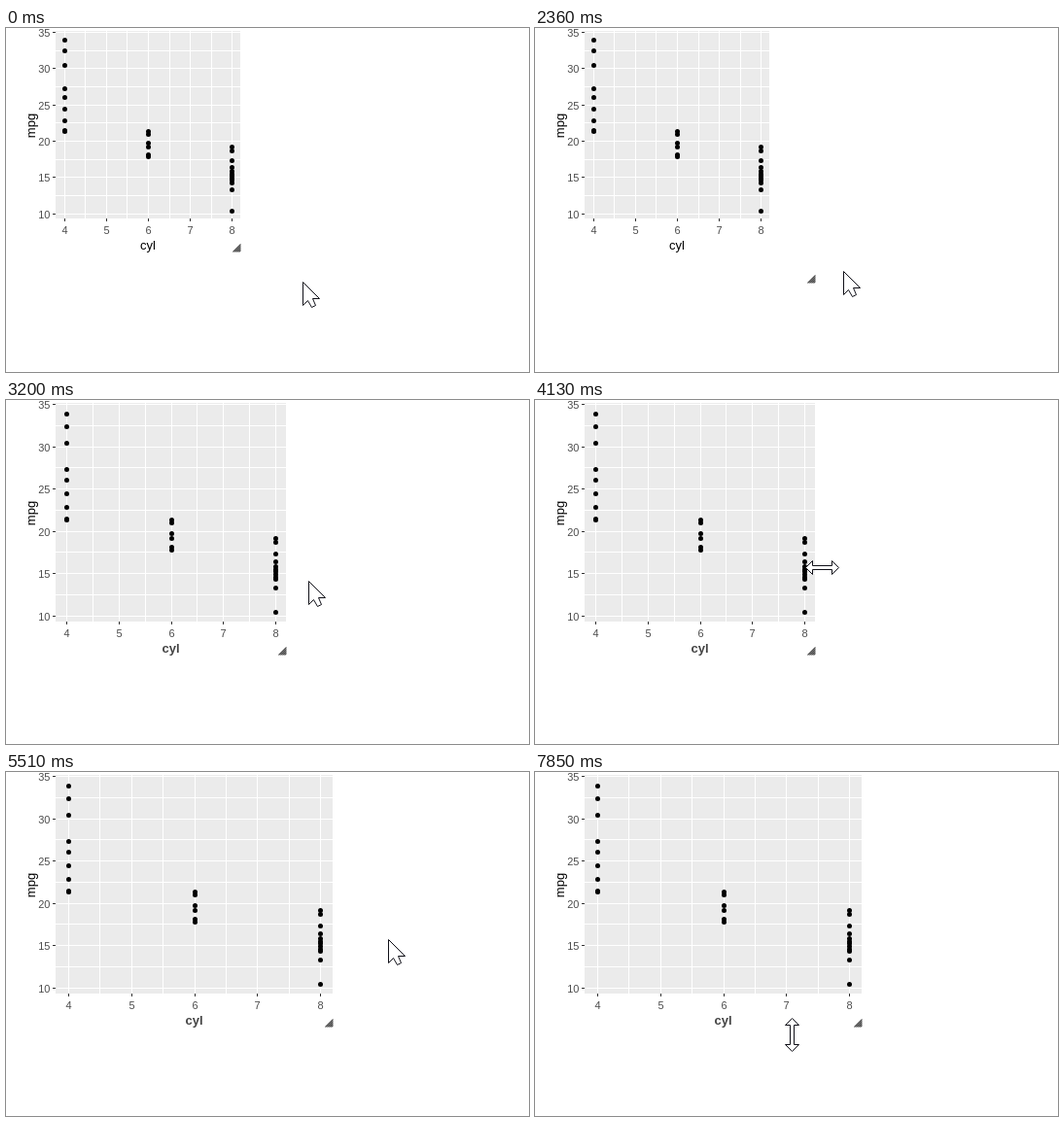
These frames come from a looping animation (538x354 px, 8 s). An HTML page:

```html
<!DOCTYPE html>
<html lang="en">
<head>
<meta charset="utf-8">
<title>Resizable scatter plot</title>
<style>
  html, body { margin: 0; width: 100%; height: 100%; overflow: hidden; background: #fff; }
  svg { display: block; width: 538px; height: 354px; }
  text { font-family: "Liberation Sans", Arial, sans-serif; font-size: 11px; fill: #4d4d4d; }
  .title { font-size: 13px; fill: #000; }
  .bold { font-weight: bold; fill: #444; }
  .line { shape-rendering: crispEdges; }
  .cursor path { fill: #fff; stroke: #101018; stroke-linejoin: round; }
</style>
</head>
<body>
<svg id="stage" viewBox="0 0 538 354"></svg>
<script>
const LOOP = 8000;
const STEP = 77;           // ms between visible cursor positions
const REDRAW_DELAY = 620;  // ms from the end of a drag to the new plot
const stage = document.getElementById('stage');

function add(parent, tag, attrs, text) {
  const el = document.createElementNS('http://www.w3.org/2000/svg', tag);
  for (const key in attrs) el.setAttribute(key, attrs[key]);
  if (text !== undefined) el.textContent = text;
  return parent.appendChild(el);
}

function range(from, to, step) {
  const count = Math.round((to - from) / step) + 1;
  return Array.from({ length: count }, (_, i) => from + i * step);
}

// Fuel economy by number of cylinders
const data = {
  4: [33.9, 32.4, 30.4, 27.3, 26, 24.4, 22.8, 21.5, 21.4],
  6: [21.4, 21, 19.7, 19.2, 18.1, 17.8],
  8: [19.2, 18.7, 17.3, 16.4, ...range(14.3, 15.8, 0.3), 13.3, 10.4]
};

const firstSize = { x: 241, y: 230 };
const plotLayer = add(stage, 'g', {});
let shownSize = '';

// The panel's right and bottom edges follow the size set with the grip
function drawPlot(size) {
  const key = size.x + ',' + size.y;
  if (key === shownSize) return;
  shownSize = key;
  plotLayer.replaceChildren();

  const left = 51, top = 3, right = size.x, bottom = size.y - 34;
  const w = right - left, h = bottom - top;
  const px = v => Math.round(left + w * (v - 3.8) / 4.4) + 0.5;
  const py = v => Math.floor(bottom - h * (v - 9.225) / 25.85 + 1) + 0.5;
  const line = (d, stroke) => add(plotLayer, 'path', { d, stroke, class: 'line' });
  const label = (text, attrs) => add(plotLayer, 'text', { 'text-anchor': 'middle', ...attrs }, text);

  add(plotLayer, 'rect', { x: left, y: top, width: w, height: h, fill: '#ebebeb', class: 'line' });
  for (const v of range(4, 8, 0.5)) line(`M${px(v)} ${top}V${bottom}`, '#fff');
  for (const v of range(10, 35, 2.5)) line(`M${left} ${py(v)}H${right}`, '#fff');

  for (const v of range(4, 8, 1)) {
    line(`M${px(v)} ${bottom}v3`, '#333');
    label(v, { x: px(v), y: bottom + 16 });
  }
  for (const v of range(10, 35, 5)) {
    line(`M${left - 3} ${py(v)}h3`, '#333');
    label(v, { x: left - 5.5, y: py(v) + 4.5, 'text-anchor': 'end' });
  }
  for (const cyl in data)
    for (const mpg of data[cyl])
      add(plotLayer, 'circle', { cx: px(+cyl), cy: py(mpg), r: 2.5 });

  const resized = size.x !== firstSize.x;
  label('cyl', { x: (left + right) / 2, y: bottom + 31.5, class: resized ? 'title bold' : 'title' });
  label('mpg', {
    transform: `translate(29.5 ${(top + bottom) / 2 + 1}) rotate(-90)`, class: 'title'
  });
}

const grip = add(stage, 'path', {
  d: range(2, 8, 2).map(n => `M${-n} 0L0 ${-n}`).join(''),
  stroke: '#4a4a4a', 'stroke-width': 1.1, fill: 'none'
});

const cursor = add(stage, 'g', { class: 'cursor' });
const doubleArrow = 'M-17 0L-10-7V-2H10V-7L17 0L10 7V2H-10V7Z';
const shapes = {
  arrow: add(cursor, 'path', { d: 'M0 0V24L5 19L9 26L13 24L10 17H17Z' }),
  nwse: add(cursor, 'path', { d: 'M-12-12H-3L-5.5-9.5L9.5 5.5L12 3V12H3L5.5 9.5L-9.5-5.5L-12-3Z' }),
  ew: add(cursor, 'path', { d: doubleArrow }),
  ns: add(cursor, 'path', { d: doubleArrow, transform: 'rotate(90)' })
};

// Each move starts where the one before ended
const moves = [];
const glide = (at, until, x, y, over = 'arrow') => moves.push({ at, until, x, y, over });
const drag = (at, until, x, y, over) => moves.push({ at, until, x, y, over, held: true });

glide(0, 0, 305, 261);
glide(510, 1050, 235, 229, 'nwse');
drag(1420, 1810, 282, 261, 'nwse');
glide(2360, 2360, 317, 250);
glide(2440, 2590, 358, 240);
glide(3050, 3200, 311, 186);
glide(3280, 3520, 284, 169);
glide(3750, 3830, 293, 172);
glide(4130, 4130, 295, 172, 'ew');
drag(4590, 4890, 343, 172, 'ew');
glide(5200, 5360, 393, 172);
glide(5910, 6600, 260, 267);
glide(6920, 7390, 260, 238);
glide(7620, 7770, 265, 266);
glide(7850, 7850, 264, 270, 'ns');

// Share of a move done at time t, in hard steps with a soft stop
function progress(move, t) {
  const steps = Math.round((move.until - move.at) / STEP) + 1;
  const k = Math.min(steps, 1 + Math.floor((t - move.at + 9) / STEP));
  return 1 - (1 - k / steps) ** 1.35;
}

function stateAt(t) {
  let { x, y } = moves[0];
  let shape = 'arrow', corner = firstSize, size = firstSize;
  for (const move of moves) {
    if (move.at > t) break;
    const p = progress(move, t);
    const dx = (move.x - x) * p, dy = (move.y - y) * p;
    x += dx;
    y += dy;
    shape = move.held || p === 1 ? move.over : 'arrow';
    if (move.held) {
      corner = { x: corner.x + dx, y: corner.y + dy };
      if (t >= move.until + REDRAW_DELAY) size = corner;
    }
  }
  return { x, y, shape, corner, size };
}

// Whole pixels, drawn through pixel centres
const place = (el, p) =>
  el.setAttribute('transform', `translate(${Math.floor(p.x) + 0.5} ${Math.floor(p.y) + 0.5})`);

function render(t) {
  const state = stateAt(t);
  drawPlot(state.size);
  place(grip, state.corner);
  place(cursor, state);
  for (const name in shapes) shapes[name].style.display = name === state.shape ? '' : 'none';
}

function tick() {
  render(performance.now() % LOOP);
  requestAnimationFrame(tick);
}
render(0);
requestAnimationFrame(tick);
</script>
</body>
</html>
```
